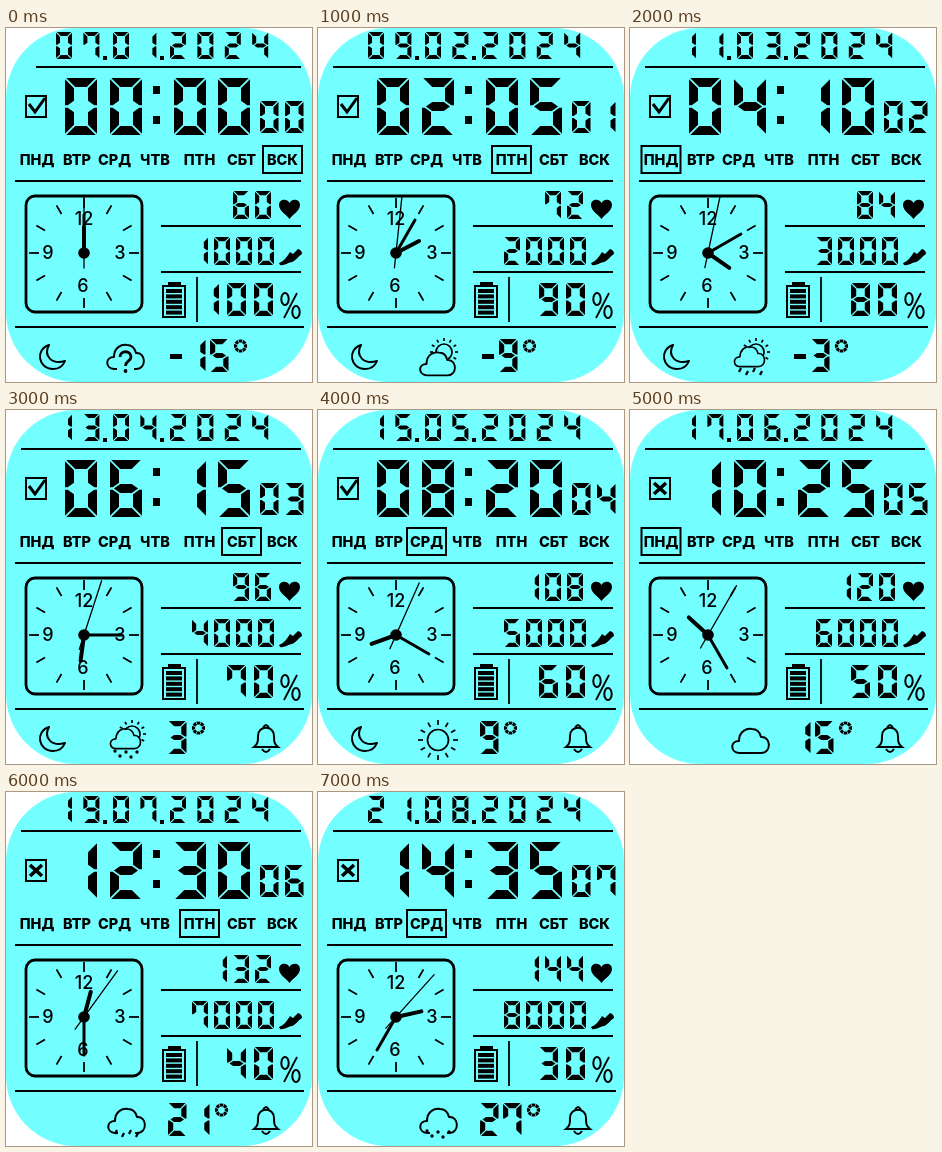
These frames come from a looping animation (306x354 px, 8 s). An HTML page with a canvas:

```html
<!DOCTYPE html>
<html lang="ru">
<head>
<meta charset="utf-8">
<title>LCD watch face</title>
<style>
  html, body { margin: 0; width: 100%; height: 100%; overflow: hidden; background: #fff; }
  canvas { display: block; width: 306px; height: 354px; }
</style>
</head>
<body>
<canvas id="face"></canvas>
<script>
const canvas = document.getElementById('face');
const ctx = canvas.getContext('2d');
const W = 306, H = 354, STEP = 1000, STEPS = 8, TAU = Math.PI * 2;
const CYAN = '#73ffff', INK = '#000';
const scale = window.devicePixelRatio || 1;
canvas.width = W * scale;
canvas.height = H * scale;

const DIGITS = ['abcdef', 'bc', 'abged', 'abgcd', 'fgbc', 'afgcd', 'afgedc', 'fabc', 'abcdefg', 'abcdfg'];
const DAYS = [['ВСК', 276.5], ['ПНД', 31], ['ВТР', 71], ['СРД', 108.5], ['ЧТВ', 149], ['ПТН', 193.5], ['СБТ', 235.5]];
const pad = n => String(n).padStart(2, '0');

function trace(points) {
  ctx.beginPath();
  points.forEach(([x, y]) => ctx.lineTo(x, y));
}

function stroke(points, width = 2) {
  trace(points);
  ctx.lineWidth = width;
  ctx.stroke();
}

function fill(points) {
  trace(points);
  ctx.fill();
}

function path(d, width) {
  const shape = new Path2D(d);
  if (width) {
    ctx.lineWidth = width;
    ctx.stroke(shape);
  } else ctx.fill(shape);
}

function dot(x, y, r) {
  ctx.beginPath();
  ctx.arc(x, y, r, 0, TAU);
  ctx.fill();
}

function at(x, y, draw) {
  ctx.save();
  ctx.translate(x, y);
  draw();
  ctx.restore();
}

// Seven bevelled segments; the lower and right ones are mirrored.
function digit(n, x, y, { w, h, t }) {
  const g = 0.5 + t * 0.08, m = h / 2;
  const bar = [[g, 0], [w - g, 0], [w - t - g, t], [t + g, t]];
  const side = [[0, g], [t, t + g], [t, m - t / 2 - g], [t * 0.3, m - g], [0, m - g]];
  const middle = [[t * 0.3 + g, m], [t + g, m - t / 2], [w - t - g, m - t / 2],
    [w - t * 0.3 - g, m], [w - t - g, m + t / 2], [t + g, m + t / 2]];
  for (const s of DIGITS[n]) {
    const shape = s === 'g' ? middle : 'ad'.includes(s) ? bar : side;
    const flipX = 'bc'.includes(s), flipY = 'cde'.includes(s);
    fill(shape.map(([px, py]) => [x + (flipX ? w - px : px), y + (flipY ? h - py : py)]));
  }
}

function number(text, x, y, style) {
  [...String(text)].forEach((c, i) => digit(+c, x + i * style.pitch, y, style));
}

function numberRight(text, right, y, style) {
  const count = String(text).length;
  number(text, right - style.w - (count - 1) * style.pitch, y, style);
}

const DATE = { w: 16, h: 27, t: 4, pitch: 27.4 };
const CLOCK = { w: 32, h: 57, t: 9, pitch: 45 };
const SECONDS = { w: 18.5, h: 32, t: 5, pitch: 25 };
const COUNT = { w: 16, h: 28, t: 4.2, pitch: 22 };
const BATTERY = { w: 19, h: 33, t: 5.2, pitch: 27 };
const TEMP = { w: 18.5, h: 33, t: 5.2, pitch: 23 };

function drawHeader(k, date) {
  number(pad(date.getDate()), 50, 4, DATE);
  number(pad(k + 1), 107, 4, DATE);
  number(date.getFullYear(), 164, 4, DATE);
  ctx.fillRect(97, 28, 4, 4);
  ctx.fillRect(154, 28, 4, 4);
  stroke([[k ? 15 : 30, 39], [295, 39]]);

  number(pad(k * 2), 59, 50, CLOCK);
  number(pad(k * 5), 168, 50, { ...CLOCK, pitch: 44 });
  ctx.fillRect(147, 58, 7, 8);
  ctx.fillRect(147, 88, 7, 8);
  number(pad(k), 254, 73, SECONDS);

  ctx.lineWidth = 2;
  ctx.strokeRect(20, 68, 20, 21);
  if (k < 5) stroke([[23, 76], [29, 84], [39, 70]], 3);
  else {
    stroke([[24, 73], [36, 84]], 3.6);
    stroke([[36, 73], [24, 84]], 3.6);
  }
}

function drawDays(today) {
  ctx.font = '800 14.5px Inter, sans-serif';
  ctx.textAlign = 'center';
  ctx.textBaseline = 'alphabetic';
  DAYS.forEach(([name, x], i) => {
    ctx.fillText(name, x, 137);
    if (i !== today) return;
    ctx.lineWidth = 2;
    ctx.strokeRect(x - 19.5, 118, 39, 27);
  });
  stroke([[9, 153], [295, 153]]);
}

function hand(turn, from, to, width) {
  ctx.save();
  ctx.rotate(turn * TAU);
  stroke([[0, -from], [0, -to]], width);
  ctx.restore();
}

function drawDial(k) {
  ctx.beginPath();
  ctx.roundRect(20, 168, 116, 116, 9);
  ctx.lineWidth = 2.8;
  ctx.stroke();
  at(78, 225, () => {
    for (let i = 0; i < 12; i++) hand(i / 12, 45, 55, 1.8);
    ctx.font = '500 18px Inter, sans-serif';
    ctx.textAlign = 'center';
    ctx.textBaseline = 'middle';
    [['12', 0, -33], ['3', 36, 1], ['6', -1, 34], ['9', -36, 1]].forEach(n => ctx.fillText(...n));
    ctx.lineCap = 'round';
    const minutes = k * 5;
    hand((k * 2 + minutes / 60) / 12, 0, 26, 4);
    hand(minutes / 60, 0, 38, 3);
    hand(k / 60, -15, 57, 1.3);
    dot(0, 0, 5.8);
  });
}

function drawStats(k) {
  numberRight(60 + 12 * k, 265, 163, COUNT);
  path('M283.5 191C280 186 273 183 273 177C273 171 281 170 283.5 175C286 170 294 171 294 177C294 183 287 186 283.5 191Z');
  stroke([[155, 198], [295, 198]]);

  numberRight(1000 * (k + 1), 268, 209, COUNT);
  path('M273 235C278 233 281 229 284 224L287 226L292 221Q296 222 296 226C292 228 290 233 286 234C281 235 278 238 274 237Z');
  stroke([[155, 244], [295, 244]]);

  ctx.fillRect(162, 254, 13, 4);
  ctx.lineWidth = 2;
  ctx.strokeRect(157, 258, 22, 31);
  for (let i = 0; i < 5; i++) ctx.fillRect(160, 261 + i * 5.4, 16, 4);
  stroke([[191, 249], [191, 294]], 1.8);
  numberRight(100 - 10 * k, 267, 255, BATTERY);

  ctx.lineWidth = 2;
  for (const [x, y] of [[279, 271], [290, 284]]) {
    ctx.beginPath();
    ctx.ellipse(x, y, 3.7, 6, 0, 0, TAU);
    ctx.stroke();
  }
  stroke([[291, 265], [278, 290]], 1.8);
  stroke([[9, 299], [298, 299]]);
}

function cloud(x, y, size = 1, open = false) {
  at(x, y, () => {
    ctx.scale(size, size);
    const top = 'C-20 12-20 1-11 1C-11-9-3-12 2-11C7-11 10-7 11-3C21-4 22 13 11 13';
    if (open) path('M-8 13H-11' + top + 'H9', 2);
    else path('M-11 13' + top + 'Z', 2);
  });
}

function sun(x, y, r, inner, outer, first = 0, last = 12) {
  ctx.beginPath();
  ctx.arc(x, y, r, first / 12 * TAU - TAU / 4, last / 12 * TAU - TAU / 4);
  ctx.lineWidth = 1.7;
  ctx.stroke();
  at(x, y, () => {
    for (let i = first; i < last; i++) hand(i / 12, inner, outer, 1.7);
  });
}

function rain(y) {
  [[110, 0], [117, 3], [124, 0], [131, 3]].forEach(([x, dy]) => stroke([[x + 1, y + dy], [x - 1, y + dy + 4]], 2.3));
}

function snow(y) {
  [[109, 0], [114, 5], [120, 1], [125, 6], [131, 1]].forEach(([x, dy]) => dot(x, y + dy, 1.7));
}

function cloudySun(size, y) {
  sun(126, 324, 8, 11, 14, -3, 5);
  ctx.fillStyle = CYAN;
  dot(119, y, 8);
  ctx.fillRect(106, y, 29, 9);
  ctx.fillStyle = INK;
  cloud(119, y, size);
}

const WEATHER = [
  () => {
    cloud(119, 328, 1, true);
    ctx.fillStyle = CYAN;
    ctx.fillRect(112, 337, 15, 8);
    ctx.fillStyle = INK;
    path('M114 329C114 322 125 322 125 329C125 333 119.5 333 119.5 338', 2.8);
    dot(119.5, 343, 1.9);
  },
  () => cloudySun(0.95, 335),
  () => { cloudySun(0.82, 328); rain(340); },
  () => { cloudySun(0.82, 328); snow(341); },
  () => sun(120, 330, 10.5, 15, 20),
  () => cloud(120, 330),
  () => { cloud(120, 328, 1, true); rain(338); },
  () => { cloud(120, 328, 1, true); snow(339); }
];

function drawTemperature(value) {
  let x = 162;
  if (value < 0) {
    ctx.fillRect(164, 326, 12, 5);
    x += 19;
  }
  const text = String(Math.abs(value));
  number(text, x, 311, TEMP);
  at(x + text.length * 23 + 7.5, 318, () => {
    for (let i = 0; i < 8; i++) {
      ctx.beginPath();
      ctx.arc(0, 0, 5, (i - 0.42) / 8 * TAU, (i + 0.42) / 8 * TAU);
      ctx.lineWidth = 3.2;
      ctx.lineCap = 'butt';
      ctx.stroke();
    }
  });
}

function drawFooter(k) {
  ctx.lineJoin = 'round';
  if (k < 5) path('M43 317C29 321 32 341 47 341C53 341 57 338 59 333C46 337 37 328 43 317Z', 2);
  WEATHER[k]();
  ctx.lineJoin = 'miter';
  drawTemperature(6 * k - 15);
  if (k >= 3) {
    path('M248 337C252 334 252 331 252 326C252 315 268 315 268 326C268 331 268 334 272 337Z', 2);
    path('M257 318Q260 312 263 318M256 339Q260 345 264 339', 2);
  }
}

function render(time) {
  const k = Math.floor(time / STEP) % STEPS;
  const date = new Date(2024, k, 7 + 2 * k);
  ctx.setTransform(scale, 0, 0, scale, 0, 0);
  ctx.fillStyle = '#fff';
  ctx.fillRect(0, 0, W, H);
  ctx.fillStyle = CYAN;
  ctx.beginPath();
  ctx.roundRect(0, 0, W, H, 70);
  ctx.fill();
  ctx.fillStyle = ctx.strokeStyle = INK;
  drawHeader(k, date);
  drawDays(date.getDay());
  drawDial(k);
  drawStats(k);
  drawFooter(k);
}

const start = performance.now();
function loop() {
  render(performance.now() - start);
  requestAnimationFrame(loop);
}
loop();
</script>
</body>
</html>
```
